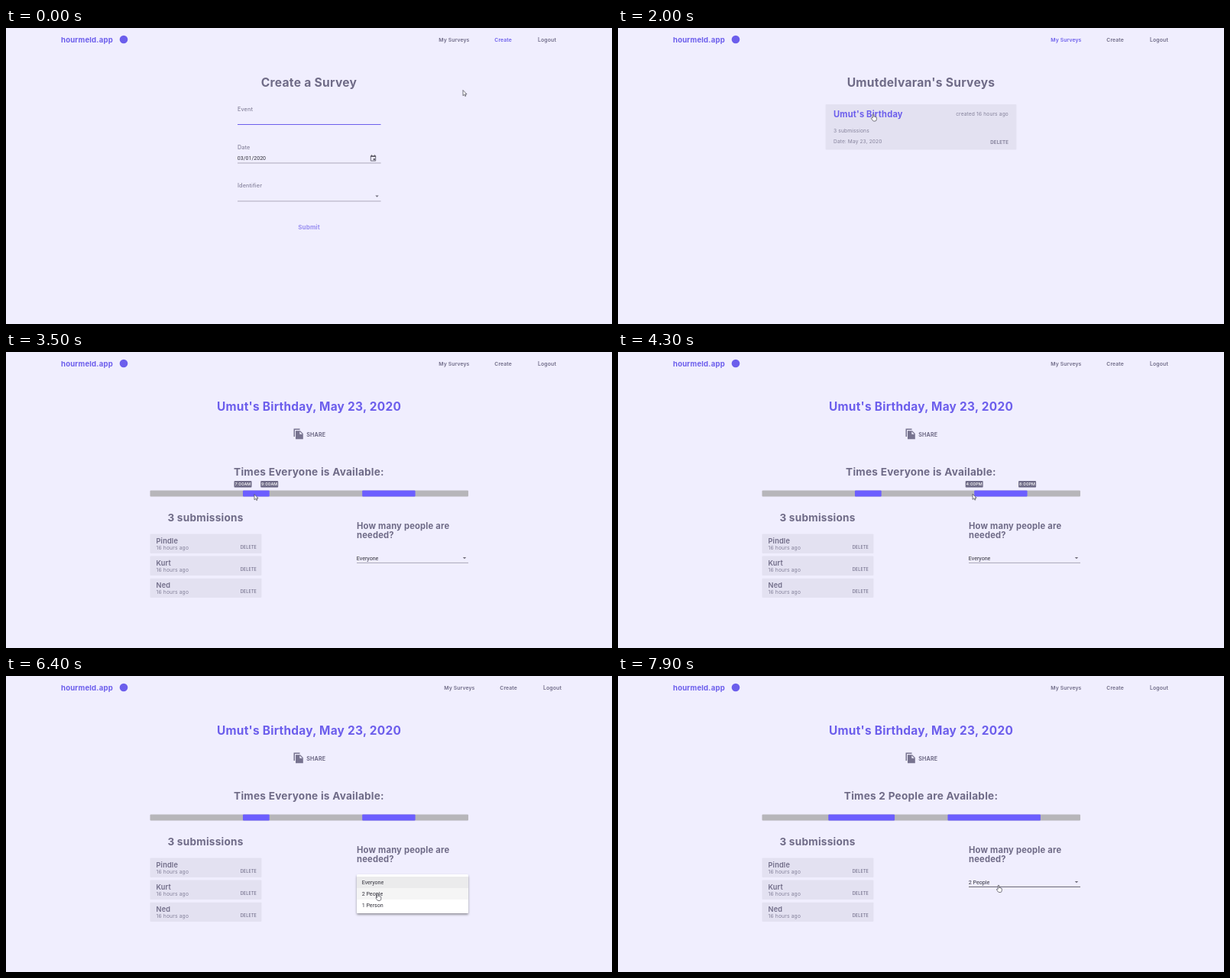
Write an HTML page that moves like this. It is 793 px wide and 388 px high and loops after 8000 ms.

```html
<!DOCTYPE html>
<html lang="en">
<head>
<meta charset="utf-8">
<title>Survey app</title>
<style>
  html, body { margin: 0; width: 100%; height: 100%; overflow: hidden; background: #f0eefe; }
  svg { display: block; width: 100vw; height: 100vh; }
  text { font-family: Inter, sans-serif; letter-spacing: .018em; fill: #6f6b87; }
  .ui { font-family: Roboto, sans-serif; letter-spacing: 0; fill: #33323c; }
  .url { font-family: 'Open Sans', sans-serif; letter-spacing: 0; fill: #55545c; }
  .b { font-weight: 700; }
  .s { font-weight: 600; }
  .m { font-weight: 500; }
  .pale { fill: #85829b; }
  .violet { fill: #6c5eec; }
  .faded { fill: #998ff1; }
  .white { fill: #fff; }
  .mid { text-anchor: middle; }
  .end { text-anchor: end; }
  .card { fill: #e3e1f1; }
  .line { stroke: #8e8c9b; stroke-width: .7; }
</style>
</head>
<body>
<svg id="stage" viewBox="0 0 793 388"></svg>
<script>
const LOOP = 8000, STEP = 100;
const BAR = { x: 188.5, y: 181.5, hour: 416.5 / 24 };
const stage = document.getElementById('stage');

const text = (x, y, size, cls, str, id = '') =>
  `<text x="${x}" y="${y}" font-size="${size}" class="${cls}"${id && ` id="${id}"`}>${str}</text>`;
const rect = (x, y, w, h, attrs = '') =>
  `<rect x="${x}" y="${y}" width="${w}" height="${h}" ${attrs}/>`;
const line = (x1, x2, y, attrs = 'class="line"') =>
  `<path d="M${x1} ${y}H${x2}" ${attrs}/>`;
const caret = (x, y) => `<path d="M${x - 2.2} ${y - 1}h4.4l-2.2 2.2z" fill="#6d6b78"/>`;
const group = (id, body) => `<g id="${id}">${body}</g>`;
const tip = i => group('tip' + i,
  rect(-11.5, 169, 23, 8.6, 'rx="1" fill="#6f6b87"') +
  text(0, 175.2, 5.4, 'mid m white', '', 'hour' + i));

const nav =
  text(72, 19, 9.6, 'b violet', 'hourmeld.app') +
  '<circle cx="154" cy="15" r="5.3" fill="#6c5eec"/>' +
  group('links',
    text(566.3, 18.2, 6.8, 's', 'My Surveys', 'navSurveys') +
    text(639.3, 18.2, 6.8, 's', 'Create', 'navCreate') +
    text(696, 18.2, 6.9, 's', 'Logout'));

const createPage =
  text(396.5, 77, 15.6, 'b mid', 'Create a Survey') +
  text(303, 108.6, 7.2, 'm pale', 'Event') +
  line(303, 490.5, 126.5, 'stroke="#6c5eec" stroke-width="1"') +
  text(303, 158.6, 7.2, 'm pale', 'Date') +
  text(302.8, 172.9, 7, 'ui', '03/01/2020') +
  line(303, 490.5, 177) +
  '<path d="M477.3 168.5v5.6h6.4v-5.6z" fill="none" stroke="#5d5b68" stroke-width=".9"/>' +
  '<path d="M476.9 167.2h7.2v1.9h-7.2zM478 166.3h1v1.5h-1zM482 166.3h1v1.5h-1zM480.7 171h2.2v2.2h-2.2z" fill="#5d5b68"/>' +
  text(303, 208.6, 7.2, 'm pale', 'Identifier') +
  caret(485.5, 220.6) + line(303, 490.5, 227) +
  text(396.5, 263.7, 8, 'b mid faded', 'Submit');

const surveyList =
  text(396.5, 77, 15.6, 'b mid', "Umutdelvaran's Surveys") +
  group('spark', rect(403.6, 44.4, 1.8, .7, 'fill="#a9a5bb"')) +
  group('surveyCard',
    rect(271.5, 100, 250, 59.5, 'class="card" rx="1"') +
    text(282, 117, 11.1, 'b violet', "Umut's Birthday") +
    text(511, 115.3, 6.7, 'end pale', 'created 16 hours ago') +
    text(282, 136.5, 6.7, 'pale', '3 submissions') +
    text(282, 151, 6.6, 'pale', 'Date: May 23, 2020') +
    text(511, 151.6, 6.1, 'b end pale', 'DELETE'));

const person = (name, i) => {
  const y = 238.5 + i * 29.1;
  return rect(188.5, y, 146, 25.4, 'class="card" rx="1"') +
    text(196.5, y + 12, 9.2, 's', name) +
    text(196.5, y + 20.2, 6.8, 'pale', '16 hours ago') +
    text(328, y + 19.7, 5.5, 'm end', 'DELETE');
};

const menu =
  rect(459, 260, 146, 51, 'rx="1.5" fill="#fff" filter="url(#shadow)"') +
  rect(459, 263, 146, 15, 'fill="#ebebec"') +
  rect(459, 278, 146, 15, 'id="hovered" fill="#f5f5f5"') +
  ['Everyone', '2 People', '1 Person'].map((s, i) => text(465.7, 272.5 + i * 15, 7.1, 'ui', s)).join('');

const detailPage =
  text(396.5, 77, 15.4, 'b mid violet', "Umut's Birthday, May 23, 2020") +
  '<path d="M376.5 100.5h8v1.5h-6.5v9h-1.5z" fill="#77738f"/>' +
  '<path d="M379 103.2h6l3.8 3.8v7.2h-9.8zM384.3 104.2v3.6h3.6z" fill="#77738f" fill-rule="evenodd"/>' +
  text(393.3, 110.5, 7.1, 'b', 'SHARE') +
  text(396.5, 161.6, 13.6, 'b mid', '', 'heading') +
  rect(BAR.x, BAR.y, BAR.hour * 24, 8, 'rx="1" fill="#b7b6ba"') +
  rect(0, BAR.y, 0, 8, 'id="seg0" rx="1" fill="#6c5eff"') +
  rect(0, BAR.y, 0, 8, 'id="seg1" rx="1" fill="#6c5eff"') +
  group('tips', tip(0) + tip(1)) +
  text(261, 222, 13.6, 'b mid', '3 submissions') +
  ['Pindle', 'Kurt', 'Ned'].map(person).join('') +
  text(459, 231.7, 11.2, 'b', 'How many people are') +
  text(459, 244.4, 11.2, 'b', 'needed?') +
  text(458.8, 272.5, 7.1, 'ui', '', 'choice') +
  caret(600, 270) + line(459, 605, 276.4, 'id="fieldLine" class="line"') +
  group('menu', menu);

const statusBar =
  rect(-1, 380.5, 266.5, 9, 'fill="#fff" stroke="#dcdbe4" stroke-width=".5"') +
  text(1.8, 386.7, 4.7, 'url', 'https://what-time.herokuapp.com/my-surveys');

const outline = 'fill="#fff" stroke="#3b3a45" stroke-width=".7" stroke-linejoin="round"';
const pointer =
  `<path id="arrow" d="M0 0V7.2L1.7 5.7L2.8 8L3.9 7.5L2.9 5.2H5z" ${outline}/>` +
  `<path id="hand" d="M-.8 5V.5Q-.8-.2 0-.2T.8.5V3.2Q1.5 2.7 2 3.4Q2.8 3 3.2 3.7Q4.3 3.4 4.3 4.6V6.3Q4.3 8.8 2.8 9H.4Q-.6 8.8-1.4 7.2L-2.6 5.5Q-2.4 4.4-1.5 4.7z" ${outline}/>`;

stage.innerHTML =
  '<defs><filter id="shadow" x="-10%" y="-20%" width="120%" height="150%">' +
  '<feDropShadow dx="0" dy="1.8" stdDeviation="1.6" flood-color="#000" flood-opacity=".4"/></filter></defs>' +
  rect(0, 0, 793, 388, 'fill="#f0eefe"') + nav +
  group('createPage', createPage) + group('surveyList', surveyList) +
  group('detailPage', detailPage) + group('status', statusBar) + group('cursor', pointer);

const el = {};
stage.querySelectorAll('[id]').forEach(n => el[n.id] = n);

const ramp = (t, a, b) => Math.min(1, Math.max(0, (t - a) / (b - a)));
const ease = u => u * u * (3 - 2 * u);
const mix = (a, b, u) => a + (b - a) * u;
const within = (t, a, b) => t >= a && t < b;
const fade = (node, v) => {
  node.setAttribute('opacity', v);
  node.style.display = v > 0 ? '' : 'none';
};

// time, x, y of the pointer tip
const PATH = [
  [0, 598, 81.5], [100, 597, 78], [500, 585.5, 13.5], [1000, 585.5, 13.5], [1200, 570, 20],
  [1800, 336, 112], [2000, 334, 113], [2700, 334, 113], [3300, 325, 186.5], [3500, 325, 186.5],
  [3700, 323, 186.5], [3800, 323, 186.5], [4500, 499, 186], [4800, 499, 186], [5200, 489, 267.5],
  [5700, 487, 268.5], [5800, 483, 286], [5900, 483, 286], [6400, 486.5, 285.5], [6800, 486, 289],
  [7500, 486, 297], [7700, 486, 297], [7900, 498, 274.5], [8000, 498, 274.5]
];
const HAND = [[400, 1200], [1800, 2300], [5100, 6700], [7800, 8000]];

function pointerAt(t) {
  const i = Math.max(1, PATH.findIndex(p => p[0] > t));
  const [a, x0, y0] = PATH[i - 1], [b, x1, y1] = PATH[i];
  const u = ease(ramp(t, a, b));
  return [mix(x0, x1, u), mix(y0, y1, u)];
}

const clock = h => `${h % 12 || 12}:00${h < 12 ? 'AM' : 'PM'}`;

function drawBar(t) {
  const u = ease(ramp(t, 6500, 6800));
  [[[7, 9], [5, 10]], [[16, 20], [14, 21]]].forEach(([from, to], i) => {
    const start = mix(from[0], to[0], u), end = mix(from[1], to[1], u);
    el['seg' + i].setAttribute('x', BAR.x + start * BAR.hour);
    el['seg' + i].setAttribute('width', (end - start) * BAR.hour);
  });
  const hours = t < 4100 ? [7, 9] : [16, 20];
  hours.forEach((h, i) => {
    el['tip' + i].setAttribute('transform', `translate(${BAR.x + h * BAR.hour} 0)`);
    el['hour' + i].textContent = clock(h);
  });
  fade(el.tips, within(t, 3300, 3900) || within(t, 4300, 5000) ? 1 : 0);
}

function draw(t) {
  const picked = t >= 6600;
  fade(el.createPage, 1 - ramp(t, 500, 700));
  fade(el.surveyList, ramp(t, 600, 800) * (1 - ramp(t, 2100, 2300)));
  fade(el.spark, within(t, 800, 1000) ? 1 : 0);
  fade(el.surveyCard, ramp(t, 1000, 1300));
  fade(el.detailPage, ramp(t, 2300, 2600));
  fade(el.status, within(t, 500, 1300) ? 1 : 0);

  el.navCreate.classList.toggle('violet', t < 600);
  el.navSurveys.classList.toggle('violet', within(t, 400, 2200));
  const menuOpen = within(t, 5500, 6700);
  el.links.setAttribute('transform', `translate(${menuOpen ? 7 : 0} 0)`);

  el.heading.textContent = picked ? 'Times 2 People are Available:' : 'Times Everyone is Available:';
  el.choice.textContent = picked ? '2 People' : 'Everyone';
  el.fieldLine.style.stroke = within(t, 5200, 6900) || t >= 7800 ? '#2b2a33' : '';
  drawBar(t);

  fade(el.menu, ramp(t, 5400, 5600) * (1 - ramp(t, 6500, 6800)));
  const grow = mix(.75, 1, ease(ramp(t, 5400, 5700)));
  el.menu.setAttribute('transform', `translate(532 270) scale(${grow}) translate(-532 -270)`);
  fade(el.hovered, within(t, 5800, 6900) ? 1 : 0);

  const hand = HAND.some(([a, b]) => within(t, a, b));
  fade(el.hand, hand ? 1 : 0);
  fade(el.arrow, hand ? 0 : 1);
  el.cursor.setAttribute('transform', `translate(${pointerAt(t).join(' ')})`);
}

const origin = performance.now();
function tick() {
  const t = (performance.now() - origin) % LOOP;
  draw(Math.floor(t / STEP) * STEP);
  requestAnimationFrame(tick);
}
draw(0);
requestAnimationFrame(tick);
</script>
</body>
</html>
```
